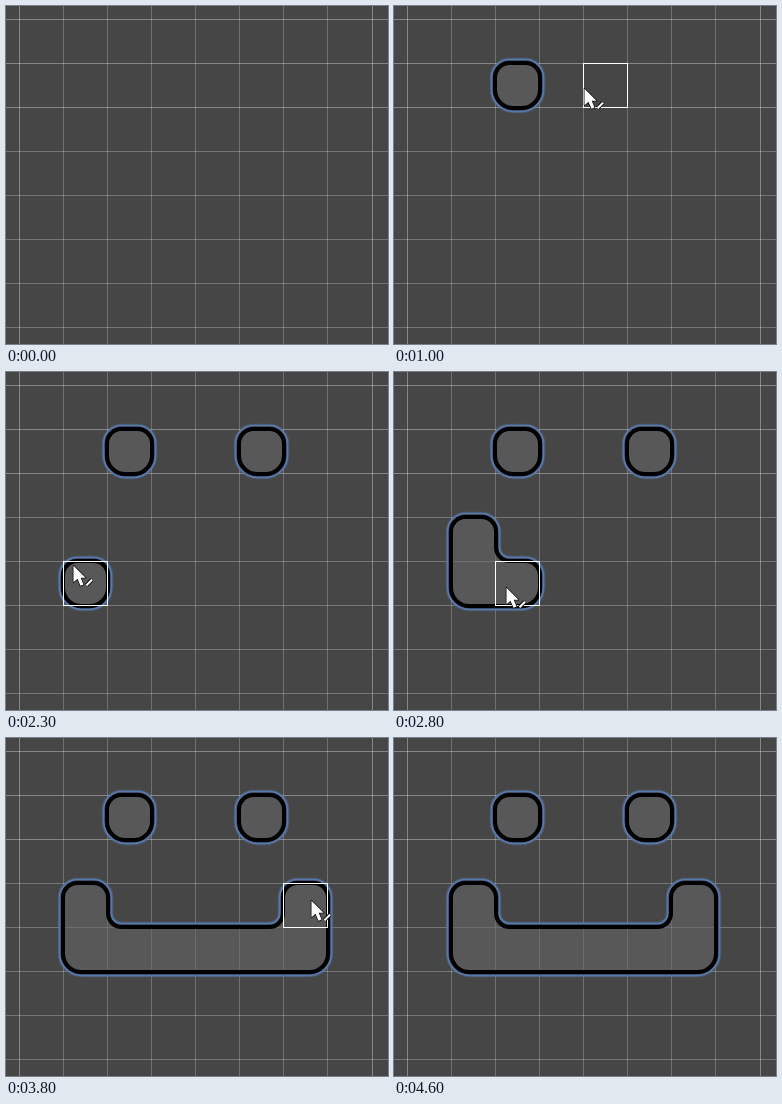
These frames come from a looping animation (382x338 px, 5900 ms). An HTML page with a canvas:

```html
<!DOCTYPE html>
<html lang="en">
<head>
<meta charset="utf-8">
<title>Tile painting</title>
<style>
  html, body { margin: 0; width: 100%; height: 100%; overflow: hidden; background: #464646; }
  canvas { display: block; }
</style>
</head>
<body>
<canvas id="stage" width="382" height="338"></canvas>
<script>
const W = 382, H = 338, CELL = 44, ORIGIN = 13, LOOP = 5900, STEP = 100;
const ctx = document.getElementById('stage').getContext('2d');

// Pointer stops; `held` means the button is down from here to the next stop
const stops = [
  { t: 0, x: -20, y: 138 },
  { t: 600, x: 127, y: 83, held: true },
  { t: 700, x: 127, y: 83 },
  { t: 1300, x: 253, y: 81, held: true },
  { t: 1700, x: 254, y: 81 },
  { t: 2200, x: 67, y: 193, held: true },
  { t: 2300, x: 67, y: 193, held: true },
  { t: 2500, x: 70, y: 172, held: true },
  { t: 2800, x: 112, y: 215, held: true },
  { t: 3400, x: 297, y: 211, held: true },
  { t: 3800, x: 305, y: 162, held: true }
];

const ease = p => (1 - Math.cos(Math.PI * p)) / 2;
const edge = i => ORIGIN + i * CELL;
const cellAt = v => Math.floor((v - ORIGIN) / CELL);

function pointerAt(t) {
  const i = stops.findLastIndex(s => s.t <= t);
  const a = stops[i], b = stops[i + 1];
  if (!b) return a;
  const p = ease((t - a.t) / (b.t - a.t));
  return { x: a.x + (b.x - a.x) * p, y: a.y + (b.y - a.y) * p, held: a.held };
}

function paintedCells(t) {
  const cells = [];
  for (let s = 0; s <= t; s += STEP) {
    const { x, y, held } = pointerAt(s);
    if (held) cells.push({ c: cellAt(x), r: cellAt(y) });
  }
  return cells;
}

// Rounded polygon, softer along its lowest edge
function roundPath(points) {
  const n = points.length, [ax, ay] = points[0], [bx, by] = points[n - 1];
  const bottom = Math.max(...points.map(p => p[1]));
  ctx.beginPath();
  ctx.moveTo((ax + bx) / 2, (ay + by) / 2);
  points.forEach(([x, y], i) => ctx.arcTo(x, y, ...points[(i + 1) % n], y === bottom ? 18 : 14));
  ctx.closePath();
}

function line(color, width) {
  ctx.strokeStyle = color;
  ctx.lineWidth = width;
  ctx.stroke();
}

function grid(strength) {
  const white = a => ctx.fillStyle = `rgba(255,255,255,${a * strength})`;
  for (let i = 0; i < 9; i++) {
    const p = edge(i);
    white(i % 8 ? 0.23 : 0.34);
    ctx.fillRect(i === 8 ? p + 1 : p, 0, 1, H);
    white(i < 3 ? 0.34 : 0.25);
    ctx.fillRect(0, p, W, 1);
  }
}

function blob(corners) {
  roundPath(corners.map(([c, r]) => [edge(c) + 0.5, edge(r) + 0.5]));
  line('rgba(88,120,172,0.4)', 11.5);
  line('#5878a8', 9.5);
  line('#262a32', 5.8);
  line('#000', 5);
  ctx.fillStyle = '#585858';
  ctx.fill();
  ctx.save();
  ctx.clip();
  grid(0.5);
  ctx.restore();
  line('#000', 3);
}

const square = (c, r) => [[c, r], [c + 1, r], [c + 1, r + 1], [c, r + 1]];

// Bottom row from column 1 to `last`, with an optional raised cell at each end
function mouth(last, left, right) {
  const end = last + 1;
  if (last === 1) return [[1, left ? 3 : 4], [2, left ? 3 : 4], [2, 5], [1, 5]];
  const a = left ? [[1, 3], [2, 3], [2, 4]] : [[1, 4]];
  const b = right ? [[last, 4], [last, 3], [end, 3]] : [[end, 4]];
  return [...a, ...b, [end, 5], [1, 5]];
}

function frame(t, x, y) {
  const c = cellAt(x), r = cellAt(y);
  if (c < 0 || r < 0) return;
  const px = edge(c), py = edge(r);
  ctx.strokeStyle = '#fff';
  ctx.lineWidth = t >= 600 && t < 800 ? 2 : 1;
  ctx.strokeRect(px + 0.5, py + 0.5, CELL, CELL);
  if (t >= 1300 && t < 1800) {
    ctx.fillStyle = '#f6ee12';
    for (const top of [py, py + CELL]) ctx.fillRect(px, top - 0.5, CELL + 1, 2);
  }
}

const arrow = new Path2D('M0 0V16.5L4 13L7 20L10 18.8L7.2 12H12Z');
const pencil = new Path2D('M13 19.5L18.5 14');

function pointer(x, y) {
  ctx.save();
  ctx.translate(x + 0.5, y + 0.7);
  ctx.lineJoin = 'round';
  ctx.strokeStyle = '#111';
  ctx.lineWidth = 1.6;
  ctx.stroke(arrow);
  ctx.fillStyle = '#fff';
  ctx.fill(arrow);
  ctx.lineWidth = 4;
  ctx.stroke(pencil);
  ctx.strokeStyle = '#fff';
  ctx.lineWidth = 2;
  ctx.stroke(pencil);
  ctx.restore();
}

function draw(t) {
  ctx.fillStyle = '#464646';
  ctx.fillRect(0, 0, W, H);
  grid(1);

  const painted = paintedCells(t);
  const has = (c, r) => painted.some(p => p.c === c && p.r === r);
  for (const c of [2, 5]) if (has(c, 1)) blob(square(c, 1));
  const row = painted.filter(p => p.r === 4).map(p => p.c);
  if (row.length) blob(mouth(Math.max(...row), has(1, 3), has(6, 3)));

  if (t < STEP || t >= 4500) return;
  const { x, y } = pointerAt(t);
  ctx.globalAlpha = t < 4000 ? 1 : 1 - (t - 3900) / 600;
  frame(t, x, y);
  pointer(x, y);
  ctx.globalAlpha = 1;
}

const start = performance.now();
function tick() {
  const t = (performance.now() - start) % LOOP;
  draw(Math.floor(t / STEP) * STEP);
  requestAnimationFrame(tick);
}
tick();
</script>
</body>
</html>
```
